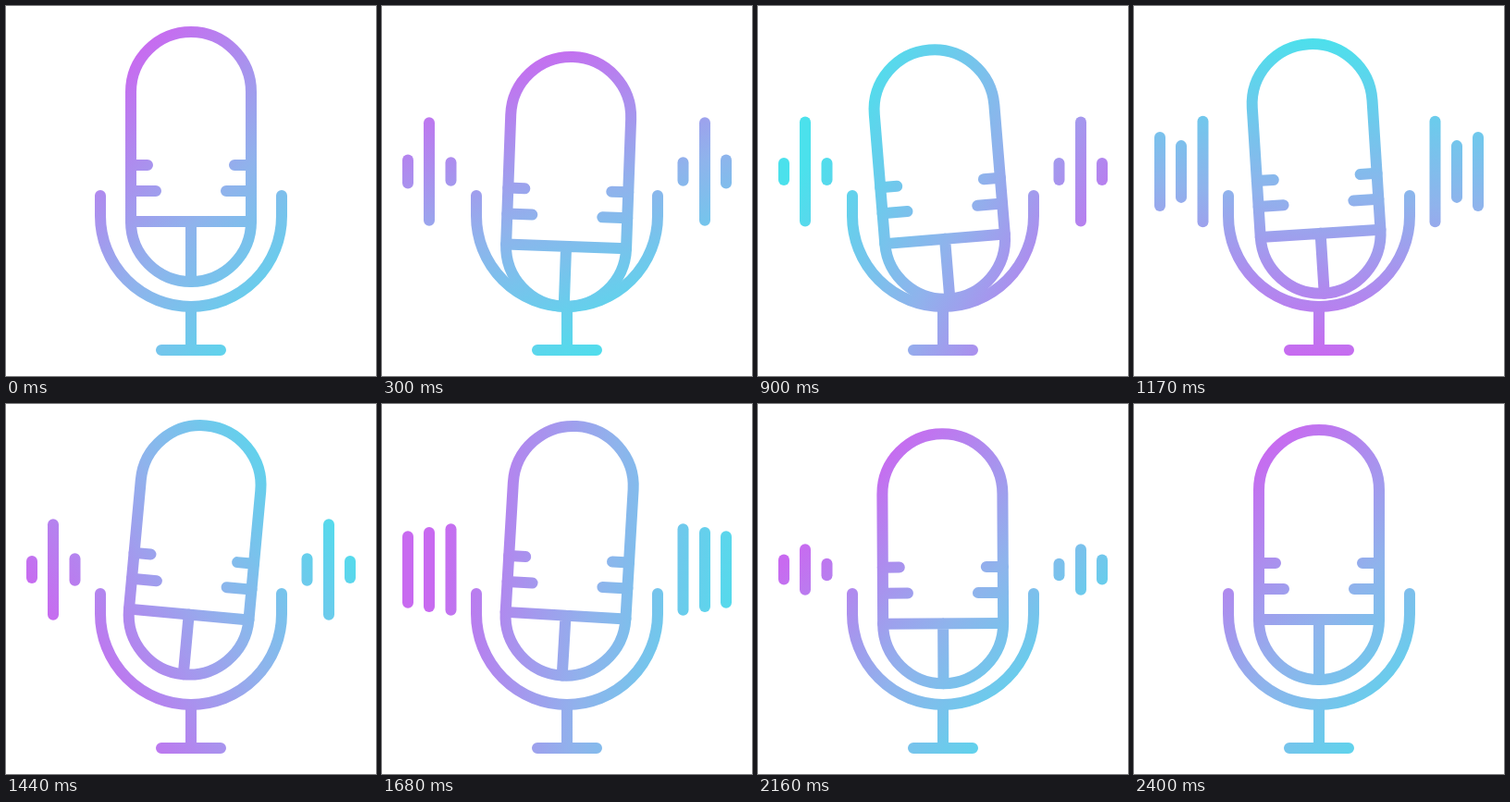
An HTML page that plays this animation: 400 px wide and 400 px high, repeating every 2430 ms.

```html
<!DOCTYPE html>
<html lang="en">
<head>
<meta charset="utf-8">
<title>Microphone</title>
<style>
  html, body { margin: 0; width: 100%; height: 100%; overflow: hidden; background: #fff; }
  svg { display: block; width: 100vw; height: 100vh; }
</style>
</head>
<body>
<svg viewBox="0 0 400 400">
  <defs>
    <linearGradient id="tint" gradientUnits="userSpaceOnUse">
      <stop offset="0" stop-color="#c86af0"/>
      <stop offset=".5" stop-color="#8fb3ec"/>
      <stop offset="1" stop-color="#4be1ec"/>
    </linearGradient>
    <mask id="shape" maskUnits="userSpaceOnUse" x="0" y="0" width="400" height="400">
      <g fill="none" stroke="#fff" stroke-width="12" stroke-linecap="round" stroke-linejoin="round">
        <path d="M102 205V227a98 98 0 0 0 196 0V205M200 325V372M168 372H232"/>
        <g id="mic">
          <rect x="135" y="28" width="130" height="270" rx="65"/>
          <path d="M135 233H265M200 233V298M135 172H153M135 200H162M265 172H247M265 200H238"/>
        </g>
      </g>
      <g id="bars" fill="#fff"></g>
    </mask>
  </defs>
  <rect width="400" height="400" fill="url(#tint)" mask="url(#shape)"/>
</svg>
<script>
const LOOP = 2430, STEP = 30, END = 2400;
const PIVOT = 208, BAR_Y = 179;
const TINT = { x: 230, y: 208, reach: 175 };
const $ = id => document.getElementById(id);

const clamp = u => Math.min(1, Math.max(0, u));
const smooth = u => { u = clamp(u); return u * u * (3 - 2 * u); };
const set = (el, attrs) => {
  for (const name in attrs) el.setAttribute(name, attrs[name]);
};

// Sum of eased moves from one [time, value] turning point to the next.
const swing = points => t => points.slice(1).reduce((sum, [time, value], i) => {
  const [from, last] = points[i];
  return sum + (value - last) * smooth((t - from) / (time - from));
}, points[0][1]);

const drop = swing([[0, 0], [310, 27], [700, -8], [950, 22], [1550, -8], [1980, 9], [2330, 0]]);
const tilt = swing([[180, 0], [600, 10.5], [1000, -7.5], [1470, 5.4], [2000, -.5], [2370, 0]]);

// One full turn, quicker in its first half.
const turn = t => 44 + 360 * smooth(1 - (1 - clamp(t / END)) ** 1.35);

// Bars pulse around a mean length; the middle one runs against its neighbours.
const pulses = [
  { x: 28, mean: 58, amp: -28, period: 540 },
  { x: 51, mean: 92, amp: 27, period: 620 },
  { x: 74.5, mean: 76, amp: -46, period: 580 }
];
const presence = t => smooth(t / 320) * smooth((END - 10 - t) / 480);
const barLength = ({ mean, amp, period }, t) =>
  presence(t) * (mean + amp * Math.cos(2 * Math.PI * (t - 905) / period));

const bars = pulses.flatMap(pulse => [pulse.x, 400 - pulse.x].map(cx => {
  const el = document.createElementNS("http://www.w3.org/2000/svg", "rect");
  $("bars").appendChild(el);
  return { el, cx, pulse };
}));

function draw(t) {
  set($("mic"), { transform: `translate(0 ${drop(t)}) rotate(${tilt(t)} 200 ${PIVOT})` });

  const angle = turn(t) * Math.PI / 180;
  const dx = TINT.reach * Math.cos(angle), dy = TINT.reach * Math.sin(angle);
  set($("tint"), { x1: TINT.x - dx, y1: TINT.y - dy, x2: TINT.x + dx, y2: TINT.y + dy });

  for (const { el, cx, pulse } of bars) {
    const height = barLength(pulse, t), width = Math.min(12, height);
    set(el, { x: cx - width / 2, y: BAR_Y - height / 2, width, height, rx: width / 2 });
  }
}

const start = performance.now();
function tick() {
  const t = (performance.now() - start) % LOOP;
  draw(Math.floor(t / STEP) * STEP);
  requestAnimationFrame(tick);
}
tick();
</script>
</body>
</html>
```
